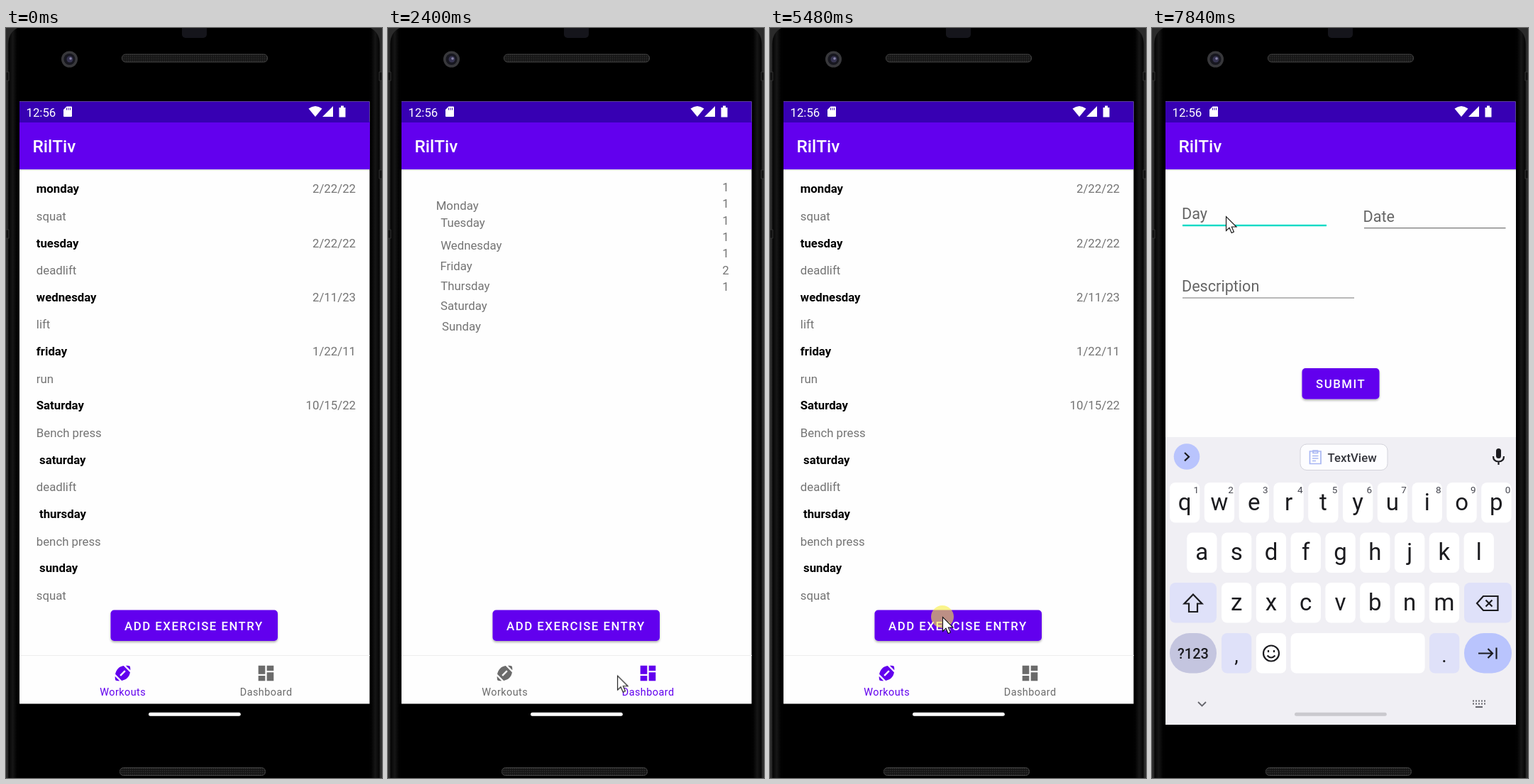
Write an HTML page that moves like this. It is 530 by 1056 pixels and loops after 8000 ms.

```html
<!DOCTYPE html>
<html lang="en">
<head>
<meta charset="utf-8">
<title>Workout log</title>
<style>
html, body { margin: 0; width: 100%; height: 100%; overflow: hidden; background: #000; }
svg { display: block; width: 100vw; height: 100vh; }
text { font: 16.8px Roboto, sans-serif; white-space: pre; }
.grey { fill: #747474; }
.day { font-weight: 700; }
.title { font-size: 24.4px; font-weight: 500; fill: #fff; }
.btn { font-weight: 500; letter-spacing: 1.5px; fill: #fff; }
.tab text { font-size: 14.4px; letter-spacing: .48px; text-anchor: middle; }
.hint { font-size: 21.6px; fill: #666; }
.mid, .key, .sup { text-anchor: middle; }
.key { font-size: 33px; fill: #1b1b1f; }
.sup { font-size: 13.5px; fill: #45464f; }
.line { stroke: #777; stroke-width: 1.2; }
.icon { fill: none; stroke: #1b1b1f; stroke-width: 2.2; }

#cursor, #halo, #list, #dash, #home, #form, #tabA, #tabB, #navRippleA, #navRippleB,
#btnRipple, #focus, #caret, #keyboard, #handle { animation: 8s linear infinite; }

#cursor { animation-name: cursor; }
@keyframes cursor {
  0%, 2.2% { transform: translate(500px, 1080px); }
  2.21% { transform: translate(472px, 1034px); }
  3.125% { transform: translate(425px, 958px); }
  4%, 6.4% { transform: translate(399px, 913px); }
  7.25% { transform: translate(397px, 917px); }
  10% { transform: translate(385px, 928px); }
  12.5% { transform: translate(375px, 920px); }
  14.875%, 28.4% { transform: translate(378px, 909px); }
  34.8%, 46% { transform: translate(160px, 919px); }
  51.8%, 71% { transform: translate(243px, 829px); }
  75.375% { transform: translate(171px, 806px); }
  77.875% { transform: translate(150px, 788px); }
  82.5% { transform: translate(1px, 520px); }
  85.6% { transform: translate(40px, 330px); }
  88.6%, 100% { transform: translate(104px, 265px); }
}
#halo { animation-name: halo; animation-timing-function: step-end; }
@keyframes halo {
  0%, 21.7%, 36.6%, 70.2%, 90.2%, 100% { opacity: 0; }
  19.1%, 34.85%, 68.45%, 88.6% { opacity: .6; }
}

#list, #dash, #tabA, #tabB { animation-timing-function: step-end; }
#list { animation-name: list; }
#dash { animation-name: dash; }
#tabA { animation-name: tabA; }
#tabB { animation-name: tabB; }
@keyframes list { 0%, 36.6%, 100% { opacity: 1; } 21.7% { opacity: 0; } }
@keyframes dash { 0%, 36.6%, 100% { opacity: 0; } 21.7% { opacity: 1; } }
@keyframes tabA { 0%, 36.6%, 100% { fill: #6200ee; } 21.7% { fill: #6b6b6b; } }
@keyframes tabB { 0%, 36.6%, 100% { fill: #6b6b6b; } 21.7% { fill: #6200ee; } }

#navRippleA { animation-name: navRippleA; }
@keyframes navRippleA {
  0%, 20.9% { transform: translate(375px, 914px) scale(.1); opacity: 0; }
  21.3% { transform: translate(375px, 914px) scale(.3); opacity: 1; }
  22.6% { transform: translate(375px, 914px) scale(.6); opacity: 1; }
  25% { transform: translate(370px, 914px) scale(1); opacity: .75; }
  28.6%, 100% { transform: translate(367px, 914px) scale(1.1); opacity: 0; }
}
#navRippleB { animation-name: navRippleB; }
@keyframes navRippleB {
  0%, 36.2% { transform: translate(162px, 916px) scale(.2); opacity: 0; }
  36.6% { transform: translate(164px, 915px) scale(.6); opacity: 1; }
  37.5% { transform: translate(167px, 914px) scale(1.03); opacity: 1; }
  40.5% { transform: translate(165px, 914px) scale(1.1); opacity: .8; }
  46%, 100% { transform: translate(165px, 914px) scale(1.1); opacity: 0; }
}
#btnRipple { animation-name: btnRipple; }
@keyframes btnRipple {
  0%, 68.7% { transform: translate(243px, 829px) scale(.1); opacity: 0; }
  69.5% { transform: translate(243px, 830px) scale(.5); opacity: .24; }
  73%, 100% { transform: translate(265px, 841px) scale(1.6); opacity: 0; }
}

/* Page change: short fade plus a slide that settles slowly */
#home { animation-name: leave; }
#form { animation-name: enter, appear; }
@keyframes leave {
  0%, 73.7% { transform: none; animation-timing-function: linear(0, .06 10%, .4 16.7%, .7 22%, .86 32%, .965 56%, 1); }
  79.3%, 100% { transform: translateX(-49.4px); }
}
@keyframes enter {
  0%, 73.7% { transform: translateX(49.4px); animation-timing-function: linear(0, .06 10%, .4 16.7%, .7 22%, .86 32%, .965 56%, 1); }
  79.3%, 100% { transform: none; }
}
@keyframes appear { 0%, 74.3% { opacity: 0; } 75.3%, 100% { opacity: 1; } }

#focus, #caret, #handle { animation-timing-function: step-end; }
#focus { animation-name: focus; }
#caret { animation-name: caret; }
#handle { animation-name: handle; }
@keyframes focus { 0% { opacity: 0; } 90.2%, 100% { opacity: 1; } }
@keyframes caret { 0%, 97.1%, 100% { opacity: 0; } 90.2% { opacity: 1; } }
@keyframes handle { 0% { fill: #fff; } 97.1%, 100% { fill: #cac9ce; } }
#keyboard { animation-name: keyboard; }
@keyframes keyboard {
  0%, 93.6% { transform: translateY(405px); animation-timing-function: cubic-bezier(.1, .6, .3, 1); }
  95.3%, 100% { transform: none; }
}
</style>
</head>
<body>
<svg viewBox="0 0 530 1056" preserveAspectRatio="none">
  <defs>
    <linearGradient id="side">
      <stop offset="0" stop-color="#303030"/><stop offset=".15" stop-color="#262626"/>
      <stop offset=".2" stop-color="#050505"/><stop offset=".5" stop-color="#161616"/>
      <stop offset=".8" stop-color="#020202"/><stop offset="1" stop-color="#000"/>
    </linearGradient>
    <radialGradient id="soft">
      <stop offset=".5" stop-opacity=".27"/><stop offset=".72" stop-opacity=".21"/>
      <stop offset="1" stop-opacity="0"/>
    </radialGradient>
    <pattern id="mesh" width="3" height="3" patternUnits="userSpaceOnUse">
      <rect width="3" height="3" fill="#161616"/><circle cx="1.5" cy="1.5" r=".8" fill="#333"/>
    </pattern>
    <filter id="shadow" x="-10%" y="-20%" width="120%" height="160%">
      <feDropShadow dx="0" dy="2" stdDeviation="1.6" flood-opacity=".3"/>
    </filter>
    <clipPath id="screen"><rect x="19" y="132" width="493.5" height="819.5"/></clipPath>
    <clipPath id="nav"><rect x="19" y="884" width="493.5" height="67.5"/></clipPath>
    <clipPath id="addShape"><rect x="147.5" y="819.5" width="235.5" height="43.5" rx="5"/></clipPath>
    <clipPath id="keyArea"><rect x="19" y="576" width="493.5" height="404.5"/></clipPath>
  </defs>

  <!-- Phone body -->
  <rect width="530" height="1056"/>
  <rect width="19" height="1056" fill="url(#side)"/>
  <rect width="19" height="1056" fill="url(#side)" transform="matrix(-1 0 0 1 530 0)"/>
  <path d="M0 0H16Q4 6 3 22H0zM530 0H514Q526 6 527 22H530z" fill="#2b2b2b"/>
  <path d="M0 62h4v12H0zM0 284h4v12H0zM526 62h4v12h-4zM526 200h4v12h-4z" fill="#111" stroke="#3a3a3a" stroke-width=".8"/>
  <rect x="248" y="-6" width="35" height="20" rx="5" fill="#15151b"/>
  <g fill="url(#mesh)" stroke="#424242">
    <rect x="163.5" y="37" width="205" height="11" rx="5"/>
    <rect x="160.5" y="1041.5" width="205" height="11" rx="5"/>
  </g>
  <circle cx="89.500" cy="44" r="11.5" fill="#38383b"/>
  <circle cx="89.500" cy="44" r="8" fill="#17171f"/>
  <circle cx="90" cy="44" r="4.500" fill="#35334f"/>
  <circle cx="91" cy="43" r="1.800" fill="#8884a8"/>

  <!-- Screen -->
  <rect x="19" y="103.5" width="493.5" height="848" fill="#fefefe"/>
  <g clip-path="url(#screen)">
    <g id="home">
      <g id="list"></g>
      <g id="dash" class="grey"></g>
      <g id="addButton"></g>
      <path d="M-40 883.5H580" stroke="#ededed"/>
      <g clip-path="url(#nav)">
        <circle id="navRippleA" r="100" fill="url(#soft)"/>
        <circle id="navRippleB" r="100" fill="url(#soft)"/>
      </g>
      <g id="tabA" class="tab">
        <path transform="translate(150.100 894.100) scale(1.2)" fill-rule="evenodd" d="M3 15.600c-.1 2.400.3 4.400.7 4.700s2.300.8 4.700.7zM13.100 3.300c-2.300.4-4.800 1.300-6.600 3.200s-2.800 4.300-3.200 6.600l7.600 7.600c2.300-.4 4.800-1.300 6.600-3.200s2.800-4.300 3.200-6.600zM9.900 15.500l-1.400-1.400 5.600-5.600 1.400 1.400zM21 8.400c.1-2.400-.3-4.400-.7-4.700s-2.300-.8-4.700-.7z"/>
        <text x="164.7" y="940">Workouts</text>
      </g>
      <g id="tabB" class="tab">
        <path transform="translate(352.100 894.100) scale(1.2)" d="M3 13h8V3H3zM3 21h8v-6H3zM13 21h8V11h-8zM13 3v6h8V3z"/>
        <text x="366.7" y="940">Dashboard</text>
      </g>
    </g>
    <g id="form"></g>
  </g>

  <!-- Status bar -->
  <rect x="19" y="103.5" width="493.5" height="29.5" fill="#3700b3"/>
  <g fill="#fff">
    <text x="28.500" y="125">12:56</text>
    <path d="M85.500 110.500H92q1 0 1 1V124q0 1-1 1H82q-1 0-1-1V115z"/>
    <path d="M436 125L426.500 113.500Q436 106.500 445.500 113.500zM461 110V125H446zM469.500 112H472V109.500H476V112H478.500V125.500H469.500z"/>
    <path d="M85.500 112.500v3m2.500-3v3m2.500-3v3" stroke="#3700b3"/>
  </g>

  <g clip-path="url(#keyArea)"><g id="keyboard"></g></g>
  <rect id="handle" x="201" y="963.800" width="129.800" height="5" rx="2.500"/>

  <g id="cursor">
    <circle id="halo" r="16" fill="#f8ee40"/>
    <path d="M.5.500V20.500L5 16.300 8.200 23.500 11.400 22 8.300 15H15z" fill="#fff" stroke="#111" stroke-width="1.100"/>
  </g>
</svg>

<script>
const fill = (id, parts) => document.getElementById(id).innerHTML = parts.flat().join('');
const text = (x, y, str, cls = '', more = '') => `<text x="${x}" y="${y}" class="${cls}" ${more}>${str}</text>`;
const box = (x, y, w, h, rx, color, more = '') =>
  `<rect x="${x}" y="${y}" width="${w}" height="${h}" rx="${rx}" fill="${color}" ${more}/>`;
const button = (x, y, w, label) =>
  box(x, y, w, 43.5, 5, '#6200ee', 'filter="url(#shadow)"') + text(x + 19.6, y + 28, label, 'btn');
const icon = (d, more = '') => `<path class="icon" d="${d}" ${more}/>`;
const appBar = box(-60, 199, 650, 1.5, 0, '#000', 'opacity=".14"') +
  box(-60, 132, 650, 67, 0, '#6200ee') + text(37.5, 175, 'RilTiv', 'title');

const workouts = [
  ['monday', 'squat', '2/22/22'], ['tuesday', 'deadlift', '2/22/22'],
  ['wednesday', 'lift', '2/11/23'], ['friday', 'run', '1/22/11'],
  ['Saturday', 'Bench press', '10/15/22'], [' saturday', 'deadlift', ''],
  [' thursday', 'bench press', ''], [' sunday', 'squat', '']
];
fill('list', workouts.map(([day, what, date], i) => {
  const y = 232.2 + i * 76.3;
  return text(day[0] === ' ' ? 47 : 42.8, y, day.trim(), 'day') +
    text(42.8, y + 38.5, what, 'grey') + text(493, y, date, 'grey', 'text-anchor="end"');
}));

const totals = [
  ['Monday', 67.7, 256], ['Tuesday', 74.2, 279.5], ['Wednesday', 74.2, 312.3], ['Friday', 73.5, 340.8],
  ['Thursday', 74.2, 369], ['Saturday', 74, 397.4], ['Sunday', 76, 425.6]
];
fill('dash', totals.map(([day, x, y], i) =>
  text(x, y, day) + text(476, 230 + i * 23.3, i === 5 ? 2 : 1, 'mid')));

fill('addButton', [
  appBar, button(147.5, 819.5, 235.5, 'ADD EXERCISE ENTRY'),
  '<g clip-path="url(#addShape)"><circle id="btnRipple" r="100" fill="#fff"/></g>'
]);

fill('form', [
  box(-60, 132, 650, 830, 0, '#fefefe'), appBar,
  text(42, 269, 'Day', 'hint'), text(297.5, 273, 'Date', 'hint'), text(42, 371, 'Description', 'hint'),
  '<path class="line" d="M43 277.800H246M299 281.600H498.500M43 380H285"/>',
  box(43, 276.8, 203, 2.4, 0, '#03dac5', 'id="focus"'),
  box(43, 250, 2.2, 25, 0, '#03dac5', 'id="caret"'),
  button(211.5, 479, 109, 'SUBMIT')
]);

const step = 48.8, blue = '#b9c4fd', pale = '#dfe1f9';
const key = (x, y, label = '', w = 42.3, color = '#fff', rx = 8) =>
  box(x, y, w, 56.5, rx, color) + text(x + w / 2, y + 38.5, label, 'key');
const row = (letters, x, y) => [...letters].map((c, i) => key(x + i * step, y, c));

fill('keyboard', [
  box(19, 576, 494, 405, 0, '#f0eff4'),
  `<circle cx="49" cy="603.500" r="18.300" fill="${blue}"/>`,
  icon('M46 598l6 5.700-6 5.700'),
  box(209, 586, 123, 36.5, 9, '#fdfdff', 'stroke="#d3d3db"'),
  icon('M222.500 596h15.500v17.500h-15.500zM227 595h6.500v3.500h-6.500zM226 602.500h8.500M226 606h8.500M226 609.500h5', 'style="stroke:#a9b7f3;stroke-width:1.7"'),
  text(247.5, 611, 'TextView', '', 'style="font-weight:500;fill:#35363d"'),
  box(485, 592, 7, 14, 3.5, '#1b1b1f'),
  icon('M481 603q0 7.500 7.500 7.500t7.500-7.500M488.500 610v5'),
  row('qwertyuiop', 25, 640),
  [...'1234567890'].map((n, i) => text(62.3 + i * step, 654.5, n, 'sup')),
  row('asdfghjkl', 49.2, 710.5),
  row('zxcvbnm', 98, 781),
  key(25, 781, '', 66, pale), key(440, 781, '', 67, pale),
  icon('M58 797.500l-12.500 13h6.500v11.500h12v-11.500h6.500z'),
  icon('M467 800h20.500v20H467l-9-10zM470.500 805.500l9 9m0-9l-9 9'),
  key(25, 852, '', 66, '#c4c5df', 28), text(58, 888, '?123', 'mid', 'style="font-size:20px;font-weight:500;fill:#1b1b1f"'),
  key(98, 852, '', 42.3, pale), text(119, 893, ',', 'key', 'style="font-size:28px"'),
  key(146.8, 852), key(195.6, 852, '', 189), key(391, 852, '', 42.3, pale),
  text(412, 893, '.', 'key', 'style="font-size:28px"'),
  icon('M179 880.500a11 11 0 1 1-22 0a11 11 0 1 1 22 0M162.500 883.500q5.500 6 11 0M164 876v3m8-3v3'),
  key(440, 852, '', 67, blue, 28),
  icon('M460 880.500h20m-6.500-6.500l6.500 6.500-6.500 6.500M485.500 872.500v16'),
  icon('M65 949l5.500 5.500 5.500-5.500', 'style="stroke:#66666d;stroke-width:1.8"'),
  icon('M452 947.500h18M452 951.500h18', 'style="stroke:#66666d;stroke-dasharray:2 2"'),
  icon('M456 956h10', 'style="stroke:#66666d"')
]);
</script>
</body>
</html>
```
